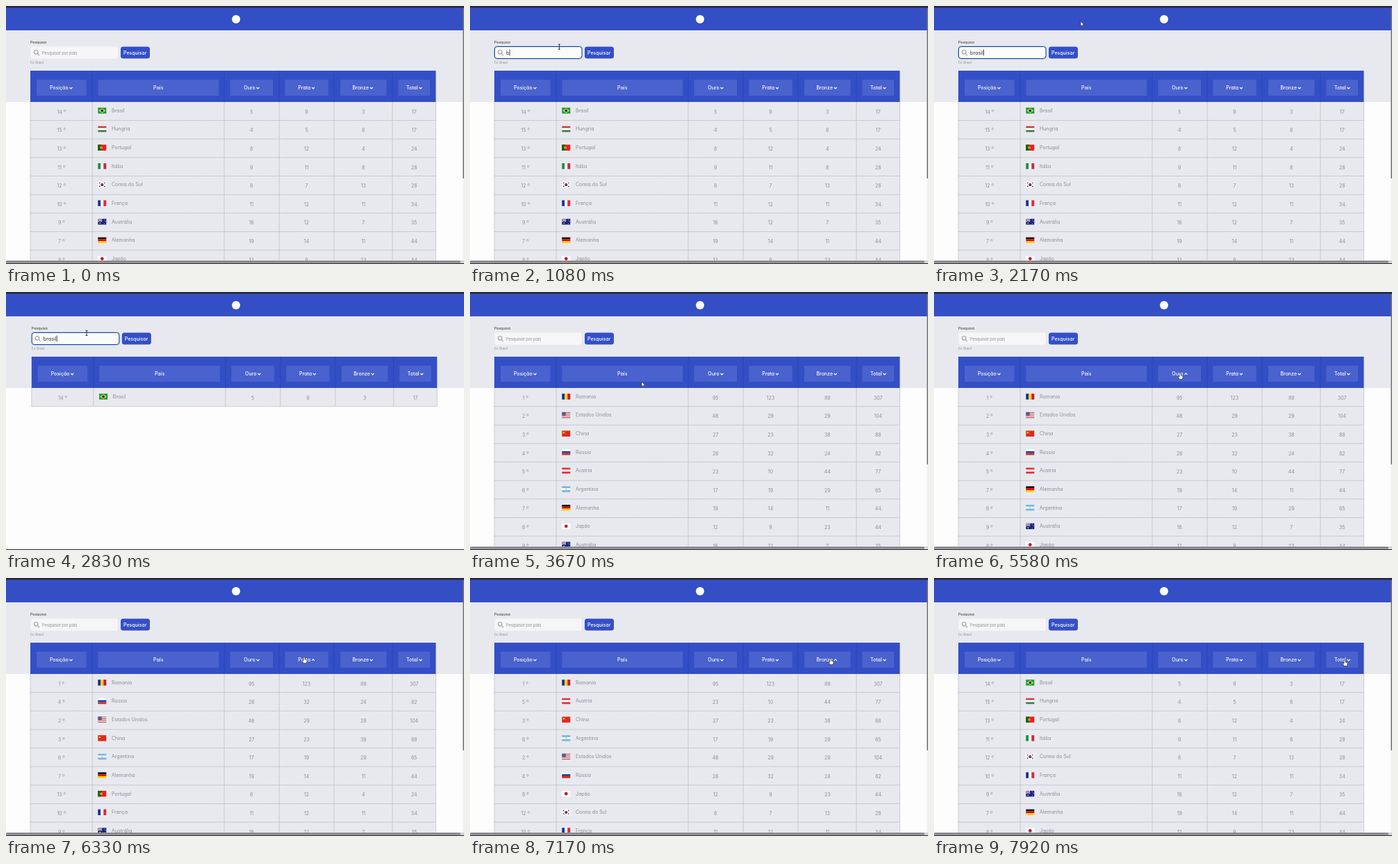
Recreate the animation shown at these times as an HTML page. Size 659x371 px, loop 8 s.

```html
<!DOCTYPE html>
<html lang="pt">
<head>
<meta charset="utf-8">
<title>Quadro de medalhas</title>
<style>
  html, body { margin: 0; width: 100%; height: 100%; overflow: hidden; background: #fdfdfd; }
  svg { display: block; width: 659px; height: 371px; }
  text { font: 7px Inter, "Open Sans", sans-serif; font-feature-settings: "cv11"; fill: #8d8d93; }
  .head { font-weight: 500; fill: #fff; }
  .mid { text-anchor: middle; }
  .end { text-anchor: end; }
  .dash { stroke: #adadb3; stroke-width: .8; stroke-dasharray: 1.6 .8; fill: none; }
  .chevron { stroke: #fff; stroke-width: 1.2; fill: none; }
</style>
</head>
<body>
<svg viewBox="0 0 659 371">
  <rect width="659" height="371" fill="#fdfdfd"/>
  <rect y="35" width="659" height="103" fill="#e8e9ee"/>
  <rect width="659" height="35" fill="#344fc6"/>
  <rect width="659" height="2.5" fill="#29292e"/>
  <circle cx="331" cy="19" r="6" fill="#fff"/>
  <g id="page">
    <text x="35" y="53.8" style="font-size:5.3px;fill:#333">Pesquisa</text>
    <rect id="glow" x="34" y="57" width="128.5" height="20" rx="5" fill="#a9cdf0"/>
    <rect id="field" x="35.5" y="58.5" width="125.5" height="17" rx="3.5"/>
    <g stroke="#a2a2a8" stroke-width="1.2" fill="none">
      <circle cx="43.2" cy="66.3" r="2.8"/><path d="M45.3 68.4L48 71.2"/>
    </g>
    <text id="hint" x="52" y="69.6" style="font-size:5.7px">Pesquisar por país</text>
    <text id="typed" x="52" y="69.6" style="font-size:7.2px;fill:#333"></text>
    <rect id="caret" y="62.5" width=".8" height="9" fill="#222"/>
    <rect x="165" y="58.5" width="42" height="17" rx="3.5" fill="#344fc6"/>
    <text class="head mid" x="185.7" y="69.6">Pesquisar</text>
    <text x="35" y="83" style="font-size:4.3px">Ex: Brasil</text>
    <g id="table"></g>
  </g>
  <g id="bars">
    <rect y="366" width="659" height="4" fill="#d4d4d8"/>
    <rect y="366.3" width="654" height="3.2" rx="1.6" fill="#858589"/>
    <rect x="657" y="35" width="2" height="331" fill="#f3f3f5"/>
    <rect x="657.4" y="3" width="1.6" height="245" rx=".8" fill="#77777c"/>
  </g>
  <rect y="370" width="659" height="1" fill="#232327"/>
  <path id="cursor" stroke-linejoin="round"/>
</svg>
<script>
const $ = id => document.getElementById(id);
const LOOP = 8000, ROW = 26.63, TOP = 138;
const EDGES = [35, 124, 314, 393, 472, 556, 618.5];
const BUTTONS = [
  // label, left, right, chevron x
  ['Posição', 44, 115.5, 93.5], ['País', 132.5, 306], ['Ouro', 322.5, 384, 362.5],
  ['Prata', 401.5, 463.5, 442], ['Bronze', 481, 547.5, 525.8], ['Total', 564.5, 610, 596.5]
];

// Flags on a 12 x 8.4 field
const box = (x, y, w, h, fill) => `<rect x="${x}" y="${y}" width="${w}" height="${h}" fill="${fill}"/>`;
const dot = (x, y, r, fill) => `<circle cx="${x}" cy="${y}" r="${r}" fill="${fill}"/>`;
const path = (d, stroke, width) => `<path d="${d}" stroke="${stroke}" stroke-width="${width}" fill="none"/>`;
const plain = fill => box(0, 0, 12, 8.4, fill);
const across = (...c) => c.map((f, i) => box(0, i * 8.4 / c.length, 12, 8.4 / c.length, f)).join('');
const upright = (...c) => c.map((f, i) => box(i * 12 / c.length, 0, 12 / c.length, 8.4, f)).join('');

const countries = [
  ['Romania', 95, 123, 89, upright('#12338f', '#f8d117', '#cb1730')],
  ['Estados Unidos', 46, 29, 29,
    across('#c64a58', '#eee', '#c64a58', '#eee', '#c64a58', '#eee', '#c64a58') + box(0, 0, 5.5, 4.8, '#535b8e')],
  ['China', 27, 23, 38, plain('#de2920') + dot(2.6, 2.8, 1.2, '#ffd51c') + dot(5, 1.5, .4, '#ffd51c') + dot(5, 4, .4, '#ffd51c')],
  ['Rússia', 26, 32, 24, across('#fff', '#1645a5', '#d62b21')],
  ['Austria', 23, 10, 44, across('#e33140', '#fff', '#e33140')],
  ['Argentina', 17, 19, 29, across('#75b5e8', '#fff', '#75b5e8') + dot(6, 4.2, 1, '#e8b43c')],
  ['Alemanha', 19, 14, 11, across('#111', '#d90c0c', '#fccf0a')],
  ['Japão', 12, 9, 23, plain('#fff') + dot(6, 4.2, 2.4, '#c71735')],
  ['Austrália', 16, 12, 7, plain('#13247f') + path('M0 0L6 4.2M6 0L0 4.2M3 0V4.2M0 2.1H6', '#fff', 1) +
    path('M3 0V4.2M0 2.1H6', '#d3202f', .6) + dot(3, 6.3, .8, '#fff') + dot(9, 1.5, .5, '#fff') + dot(9, 6.8, .5, '#fff') + dot(10.6, 3.5, .5, '#fff')],
  ['França', 11, 12, 11, upright('#12309b', '#fff', '#e1263a')],
  ['Itália', 9, 11, 8, upright('#119246', '#fff', '#ce2b37')],
  ['Coreia do Sul', 8, 7, 13, plain('#fff') + dot(6, 4.2, 2.1, '#c62c44') + box(4.2, 4.2, 3.6, 1.6, '#20458f') +
    path('M1.8 2.5L3 1M9 1L10.2 2.5M1.8 5.9L3 7.4M9 7.4L10.2 5.9', '#222', 1.1)],
  ['Portugal', 8, 12, 4, plain('#f01b1b') + box(0, 0, 4.8, 8.4, '#086a16') + dot(4.8, 4.2, 1.7, '#f6dd24') + dot(4.8, 4.2, .8, '#d8322c')],
  ['Brasil', 5, 9, 3, plain('#129b42') + '<path d="M6 .8L11 4.2L6 7.6L1 4.2Z" fill="#fbdc10"/>' + dot(6, 4.2, 1.9, '#142a7c')],
  ['Hungria', 4, 5, 8, across('#d43a43', '#fff', '#3c8156')]
].map(([name, gold, silver, bronze, flag], i) =>
  ({ name, flag, cells: [i + 1, 0, gold, silver, bronze, gold + silver + bronze] }));

const FILTERED = 2420, RESET = 3420;
// time, column, direction (-1 descending)
const clicks = [
  [4830, 0, -1], [5080, 0, 1], [5500, 2, -1], [5830, 2, 1], [6200, 3, -1],
  [6580, 3, 1], [6920, 4, -1], [7250, 4, 1], [7580, 5, -1], [7830, 5, 1]
];
// time, x, y
const route = [
  [80, 330, 372], [400, 112, 66], [900, 112, 66], [1600, 211, 22], [2300, 211, 22],
  [2700, 116, 59], [2900, 116, 59], [3080, 12, 68], [3190, 12, 68], [3400, 186, 67],
  [3640, 247, 129], [4250, 247, 129], [4650, 105, 119], [5150, 105, 119], [5450, 354, 117],
  [5880, 354, 117], [6150, 429, 114], [6620, 429, 114], [6850, 519, 116],
  [7280, 519, 116], [7520, 591, 118], [8000, 591, 118]
];
const SHAPES = {
  arrow: 'M0 0V7L1.6 5.5L2.7 8L3.8 7.5L2.7 5.1H4.9Z',
  hand: 'M-1 0Q0 -1 1 0V3L3.7 3.8Q4.4 4.2 4 6L3.2 8.6H-.6L-3 5.2Q-2.6 4 -1 5.1Z',
  beam: 'M-1.5 -3.5H1.5M0 -3.5V3.5M-1.5 3.5H1.5'
};

const sortBy = (rows, col, dir) => [...rows].sort((a, b) => dir * (a.cells[col] - b.cells[col]));

function tableAt(t) {
  if (t < FILTERED) return { rows: sortBy(countries, 5, 1) };
  if (t < RESET) return { rows: countries.filter(c => c.name === 'Brasil') };
  const done = clicks.filter(c => c[0] <= t);
  const rows = done.reduce((list, [, col, dir]) => sortBy(list, col, dir), countries);
  const [, col, dir] = done.at(-1) || [];
  return { rows, raised: dir < 0 ? col : undefined };
}

function drawTable({ rows, raised }) {
  const bottom = Math.min(371, TOP + ROW * rows.length);
  const left = EDGES[0], right = EDGES[6];
  let out = box(left, 93, right - left, 45, '#344fc6') + box(left, TOP, right - left, bottom - TOP, '#e8e9ee');
  out += EDGES.slice(1, 6).map(x => path(`M${x} 93V138`, '#2942ac', .8)).join('');
  BUTTONS.forEach(([label, x0, x1, tip], i) => {
    out += box(x0, 106, x1 - x0, 23, '#4a62cd');
    if (!tip) return out += `<text class="head mid" x="${(x0 + x1) / 2}" y="119.8">${label}</text>`;
    const [y, d] = i === raised ? [118.8, -2] : [117, 2];
    out += `<text class="head end" x="${tip - 3.8}" y="119.8">${label}</text>` +
      `<path class="chevron" d="M${tip - 2} ${y}l2 ${d}l2 ${-d}"/>`;
  });
  rows.slice(0, 9).forEach(({ name, flag, cells }, r) => {
    const y = TOP + ROW * r;
    out += `<g transform="translate(132.3 ${y + 8.2})">${flag}</g><text x="152" y="${y + 14.8}">${name}</text>`;
    cells.forEach((value, c) => {
      if (c === 1) return;
      const center = (BUTTONS[c][1] + BUTTONS[c][2]) / 2;
      out += `<text class="mid" x="${center}" y="${y + 16.7}">${value}${c ? '' : ' º'}</text>`;
    });
    out += `<path class="dash" d="M${left} ${y + ROW}H${right}"/>`;
  });
  out += EDGES.map(x => `<path class="dash" d="M${x} ${TOP}V${bottom}"/>`).join('');
  $('table').innerHTML = out;
}

function drawSearch(t) {
  const focused = t >= 500 && t < RESET;
  const count = t < 3170 ? Math.max(0, Math.min(6, Math.floor((t - 880) / 120))) : 0;
  $('typed').textContent = 'brasil'.slice(0, count);
  $('hint').style.display = count ? 'none' : '';
  $('glow').style.display = $('caret').style.display = focused ? '' : 'none';
  $('field').setAttribute('fill', focused ? '#fbfbfc' : '#f6f6f8');
  $('field').setAttribute('stroke', focused ? '#254a84' : '#f1f1f4');
  $('caret').setAttribute('x', 52.3 + (count ? $('typed').getComputedTextLength() : 0));
}

function drawCursor(t, shift) {
  const cursor = $('cursor');
  const next = route.findIndex(p => p[0] > t);
  cursor.style.display = next > 0 ? '' : 'none';
  if (next < 1) return;
  const [t0, x0, y0] = route[next - 1], [t1, x1, y1] = route[next];
  const u = (t - t0) / (t1 - t0), k = u * u * (3 - 2 * u);
  const x = x0 + (x1 - x0) * k, y = y0 + (y1 - y0) * k, px = x - shift;
  const inside = (a, b, c, d) => px > a && px < b && y > c && y < d;
  const clickable = inside(165, 207, 58, 76) || BUTTONS.some(([, a, b, tip]) => tip && inside(a, b, 106, 129));
  const kind = inside(35, 161, 58, 76) ? 'beam' : clickable ? 'hand' : 'arrow';
  cursor.setAttribute('d', SHAPES[kind]);
  cursor.setAttribute('fill', kind === 'beam' ? 'none' : '#fff');
  cursor.setAttribute('stroke', '#222');
  cursor.setAttribute('stroke-width', kind === 'beam' ? .9 : .6);
  cursor.setAttribute('transform', `translate(${x} ${y})`);
}

let shown;
function frame(now) {
  const t = now % LOOP;
  const filtered = t >= FILTERED && t < RESET;
  const shift = filtered ? 1.8 : 0;
  const table = tableAt(t);
  const key = table.rows.map(r => r.name).join() + table.raised;
  if (key !== shown) drawTable(table);
  shown = key;
  $('page').setAttribute('transform', `translate(${shift})`);
  $('bars').style.display = filtered ? 'none' : '';
  drawSearch(t);
  drawCursor(t, shift);
}

const start = performance.now();
function tick() {
  frame(performance.now() - start);
  requestAnimationFrame(tick);
}
tick();
</script>
</body>
</html>
```
